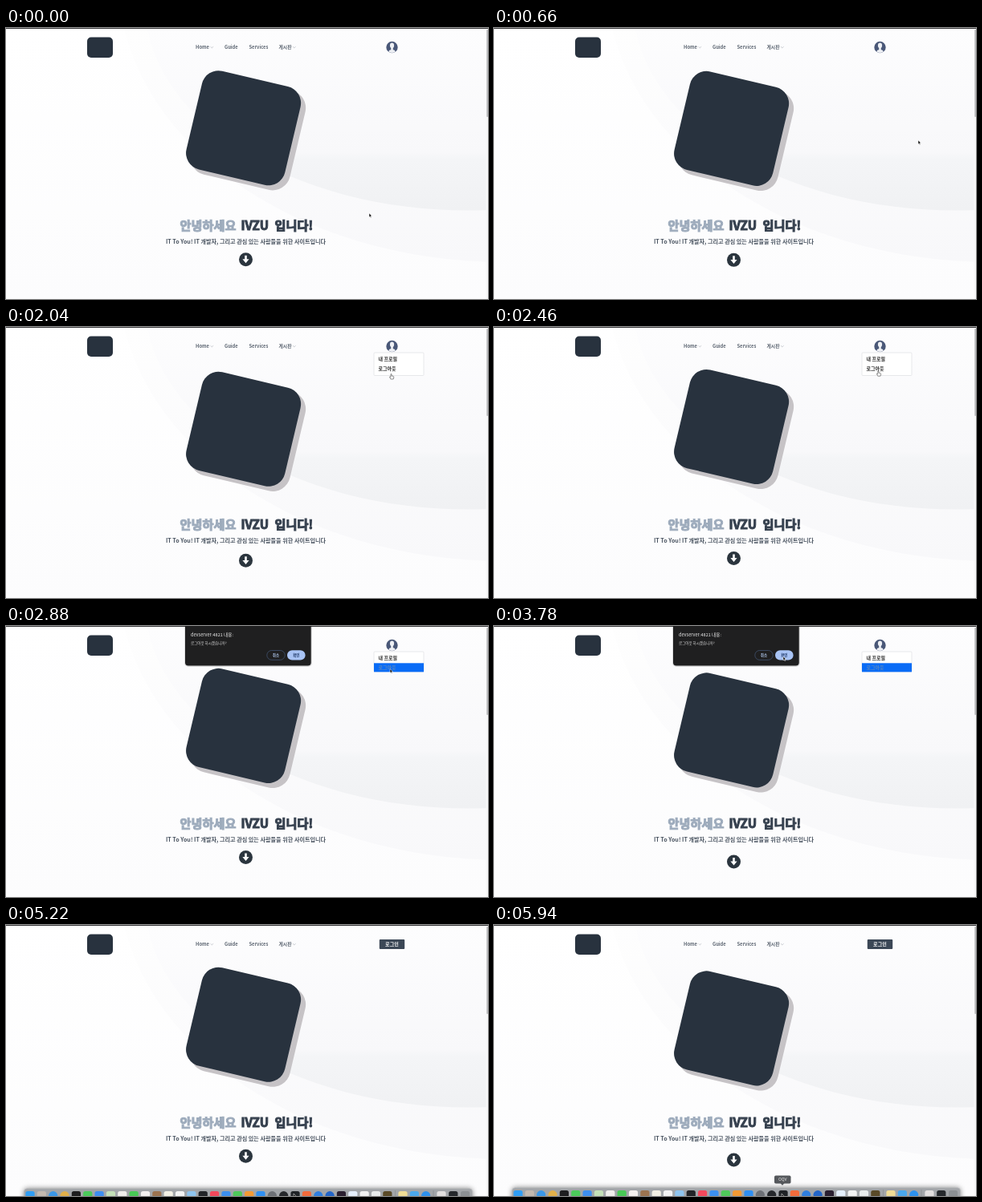
An HTML page that plays this animation: 600x338 px, repeating every 6000 ms.

```html
<!DOCTYPE html>
<html>
<head>
<meta charset="utf-8">
<style>
html, body { margin: 0; height: 100%; overflow: hidden; background: #fff; }
svg { display: block; width: 100vw; height: 100vh; }
text { font-family: "Noto Sans CJK KR", "Noto Sans CJK", "Noto Sans", sans-serif; font-weight: 700; font-size: 6px; }
.nav text { fill: #5d6672; font-size: 5.8px; }
.title { font-size: 15.2px; font-weight: 900; stroke-width: 1; }
.mid { text-anchor: middle; }
#dock { filter: drop-shadow(0 0 3px #0007); }
</style>
</head>
<body>
<svg viewBox="0 0 600 338">
  <defs>
    <linearGradient id="page" x2="0" y2="1"><stop stop-color="#fff"/><stop offset="1" stop-color="#fcfcfd"/></linearGradient>
    <linearGradient id="outer" gradientUnits="userSpaceOnUse" x1="0" y1="0" x2="0" y2="292"><stop stop-color="#fefefe"/><stop offset="1" stop-color="#f8f8fa"/></linearGradient>
    <linearGradient id="inner" gradientUnits="userSpaceOnUse" x1="0" y1="0" x2="0" y2="228"><stop stop-color="#fdfdfe"/><stop offset=".68" stop-color="#f8f8fa"/><stop offset=".72" stop-color="#f4f5f7"/><stop offset="1" stop-color="#f0f1f3"/></linearGradient>
    <clipPath id="face"><circle cx="480.5" cy="24" r="6.9"/></clipPath>
  </defs>
  <rect width="600" height="338" fill="url(#page)"/>
  <ellipse cx="620" cy="-60" rx="480" ry="352" fill="url(#outer)"/>
  <ellipse cx="575" cy="-30" rx="402" ry="257.5" fill="url(#inner)"/>
  <rect x="597.5" width="2.5" height="338" fill="#f7f7f8"/>
  <rect x="598.3" y="2" width="1.7" height="109" rx=".8" fill="#b9babc"/>
  <rect width="600" height="1" fill="#3a3a3c"/>

  <rect x="101" y="11.5" width="32" height="25.5" rx="5" fill="#28323e"/>
  <g class="nav">
    <text x="236" y="26">Home</text>
    <text x="272" y="26">Guide</text>
    <text x="302.5" y="26">Services</text>
    <text x="339.5" y="26">게시판</text>
    <path d="M254.5 23.2l1.8 1.6 1.8-1.6M357 23.2l1.8 1.6 1.8-1.6" fill="none" stroke="#a5abb3" stroke-width=".6"/>
  </g>

  <g id="card">
    <rect x="-63.5" y="-63.5" width="127" height="127" rx="22" fill="#c6c3c6" transform="translate(301.2 129.7) rotate(13.3)"/>
    <rect x="-63" y="-63" width="126" height="126" rx="21" fill="#28323e" transform="translate(295.6 124) rotate(13.3)"/>
  </g>

  <text class="title" x="216.5" y="252.3" fill="#9dabbc" stroke="#9dabbc">안녕하세요</text>
  <text class="title" x="292.5" y="252.3" fill="#36414f" stroke="#36414f">IVZU</text>
  <text class="title" x="334.5" y="252.3" fill="#36414f" stroke="#36414f">입니다!</text>
  <text class="mid" x="298.5" y="269.2" fill="#4b5562" style="font-size:7.1px">IT To You! IT 개발자, 그리고 관심 있는 사람들을 위한 사이트입니다</text>
  <g id="arrow">
    <circle cx="298.5" cy="288" r="8.5" fill="#2b353e"/>
    <path d="M297.2 283h2.6v4.6h2.8l-4.1 5-4.1-5h2.8z" fill="#fff"/>
  </g>

  <g id="avatar">
    <circle cx="480.5" cy="24" r="7.2" fill="#4a5878"/>
    <g clip-path="url(#face)" fill="#eef0f4">
      <ellipse cx="480.5" cy="21.8" rx="2.6" ry="3.4"/>
      <rect x="479.2" y="24" width="2.6" height="4"/>
      <ellipse cx="480.5" cy="30.4" rx="4.2" ry="3.3"/>
    </g>
  </g>
  <g id="login">
    <rect x="464.8" y="18" width="31.4" height="12" rx="1" fill="#3b4756"/>
    <text class="mid" x="480.4" y="26.2" fill="#fff">로그인</text>
  </g>
  <g id="menu">
    <rect id="menuBox" x="458" y="32" width="62" height="28.5" rx="1" fill="#fff" stroke="#dfe0e3" stroke-width=".7"/>
    <rect id="active" x="458" y="46.3" width="62" height="11" fill="#0a6cf6"/>
    <text x="463.5" y="42.4" fill="#222">내 프로필</text>
    <text id="logout" x="463.5" y="53.6">로그아웃</text>
  </g>
  <g id="dialog">
    <rect x="222" y="-6" width="159" height="57" rx="5" fill="#000" opacity=".12"/>
    <rect x="223" y="-6" width="156.7" height="55.6" rx="4" fill="#1f1f20"/>
    <text x="230" y="13" fill="#eee" style="font-size:5.6px;font-weight:500">devserver:4821 내용:</text>
    <text x="230" y="22.6" fill="#ddd" style="font-size:4.5px;font-weight:400">로그아웃 하시겠습니까?</text>
    <rect x="324.8" y="30.5" width="22.4" height="11.8" rx="5.9" fill="none" stroke="#46597a" stroke-width=".7"/>
    <text class="mid" x="336" y="38" fill="#b4ccf2" style="font-size:4.5px">취소</text>
    <rect x="350" y="30.3" width="22.6" height="12.2" rx="6.1" fill="#a8c3f4"/>
    <text class="mid" x="361.3" y="38" fill="#17315f" style="font-size:4.5px">확인</text>
  </g>

  <g id="dock">
    <rect x="22.5" y="327.8" width="558" height="18" rx="4" fill="#a3a6aa" stroke="#b9bbbe" stroke-width=".6"/>
    <path d="M484.5 330v8M532 330v8" stroke="#85888c" stroke-width=".6"/>
  </g>
  <g id="tip">
    <path d="M356.5 322h5l-2.5 2.8z" fill="#55585c"/>
    <rect x="349" y="312.5" width="20.5" height="10" rx="1.8" fill="#55585c"/>
    <text class="mid" x="359.2" y="319.4" fill="#eee" style="font-size:5.2px;font-weight:400">OQV</text>
  </g>

  <g id="cursor" stroke="#fff" stroke-width=".5">
    <path id="pointer" d="M0 0v4.9l1.1-1 .8 1.7.9-.4-.8-1.7h1.6z" fill="#111"/>
    <path id="hand" d="M-.5.2q.6-.6 1 .1v2l2.2.6q.8.4.5 1.6l-.5 2H-.6L-2 3.7q.4-.8 1.5.2z" fill="#fff" stroke="#222"/>
  </g>
</svg>
<script>
const LOOP = 6000;
const el = id => document.getElementById(id);
const show = (id, on) => el(id).setAttribute('visibility', on ? 'visible' : 'hidden');
const move = (id, x, y) => el(id).setAttribute('transform', `translate(${x} ${y})`);
const smooth = k => k * k * (3 - 2 * k);
const clamp = k => Math.max(0, Math.min(1, k));

// Dock items: "o" marks a round one.
const items = ('2f9df4 c3b9b0 o3a97e8 oe2b04a 1d1d1f 4bc95b 3d8ef0 c4dfb8 f0eeec 48c956 f4f1f0 9b7350 f3f0e4 f3f3f3 ' +
  '8fc4ee 222428 f2485c 3c8ff0 4fc85a f39a35 2f8ff2 o6d7076 o25272b 1f2226 f16b3c o2f7fe0 o2365c8 2a1f30 e4eefa ' +
  'f2f2f2 e9ecec 5a4a28').split(' ');
function addItem(x, code) {
  const rect = document.createElementNS('http://www.w3.org/2000/svg', 'rect');
  const attrs = { x: x - 5.6, y: 331, width: 11.2, height: 11.2, rx: code.length > 6 ? 5.6 : 2.6, fill: '#' + code.slice(-6) };
  for (const key in attrs) rect.setAttribute(key, attrs[key]);
  el('dock').append(rect);
}
items.forEach((code, i) => addItem(30 + i * 14.35, code));
['f0dc96', '4aa7ec', 'o2d91ee'].forEach((code, i) => addItem(494 + i * 14.35, code));
['e2dfdf', '25282c', '8c9094'].forEach((code, i) => addItem(542 + i * 14.8, code));

const path = [
  [0, 452, 231], [180, 452, 231], [660, 528, 140], [860, 548, 80], [1080, 481, 32], [1200, 476.5, 28.5],
  [1500, 477, 30], [1900, 479.5, 58.5], [2160, 479.5, 58.5], [2600, 478, 53.5], [3240, 478, 53.5],
  [3640, 360, 38], [4560, 360, 38], [5150, 358, 335], [LOOP, 358, 335]
];
function cursorAt(t) {
  const i = path.findIndex(p => p[0] > t);
  const [t0, x0, y0] = path[i - 1], [t1, x1, y1] = path[i];
  const k = smooth((t - t0) / (t1 - t0));
  return [x0 + (x1 - x0) * k, y0 + (y1 - y0) * k];
}

function draw(t) {
  const bob = 3 - 3 * Math.cos((t - 280) / 2400 * 2 * Math.PI);
  move('card', 0, bob);
  move('arrow', 0, bob);

  const loggedIn = t < 4080, pressed = t >= 2640, hand = t >= 1080 && t < 2640;
  show('avatar', loggedIn);
  show('login', !loggedIn);
  show('menu', t >= 1440 && loggedIn);
  show('active', pressed && loggedIn);
  el('menuBox').setAttribute('height', pressed ? 25 : 28.5);
  el('logout').setAttribute('fill', pressed ? '#5c88bd' : '#222');
  show('dialog', t >= 2760 && loggedIn);

  show('dock', t >= 5040);
  move('dock', 0, 12 * (1 - smooth(clamp((t - 5040) / 220))));
  show('tip', t >= 5340);

  move('cursor', ...cursorAt(t));
  show('pointer', !hand);
  show('hand', hand);
}

function tick() {
  draw(performance.now() % LOOP);
  requestAnimationFrame(tick);
}
tick();
</script>
</body>
</html>
```
